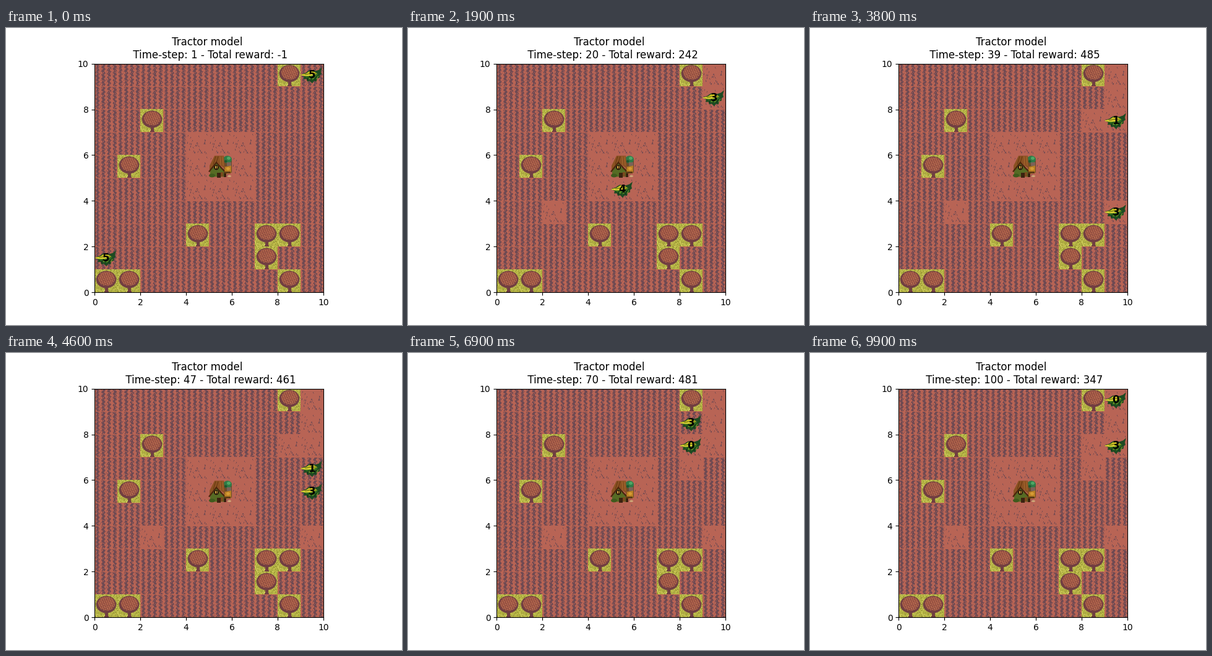
These frames come from a looping animation (640x480 px, 10000 ms). A matplotlib script:

```python
import numpy as np
import matplotlib.pyplot as plt
from matplotlib.animation import FuncAnimation
from matplotlib.patches import Circle, Ellipse, Polygon, Rectangle
from matplotlib.transforms import Affine2D

N, S = 10, 37  # cells per side, pixels per cell
STEPS = 100
rng = np.random.default_rng(4)
yy, xx = np.mgrid[:S, :S].astype(float)

SOIL = np.array([184, 100, 85])
FURROW = np.array([108, 73, 82])
TREES = [(8, 9), (2, 7), (1, 5), (4, 2), (7, 2), (8, 2), (7, 1),
         (0, 0), (1, 0), (8, 0)]
YARD = {(x, y) for x in range(4, 7) for y in range(4, 7)}

# One letter per step: a move, H for harvest, a dot for waiting
ROUTES = [
    ((0, 1), "URURHUUDL.R" ".R.RU.DR.R." "RDRU.L.R.RD" "HD.U.D.U..."
             "UU..L.R..L." ".U.D.R.U..." "UUL..R.L.R." "D.U.U.D.L.R"
             "D.U.D......"),
    ((9, 9), "..H..D...U." "D.H.D.U.D.H" ".UU.D...L.D" ".H.R.D.L.R."
             "...L..H..U." ".R.U.L.D..." "...D.U....." "........R.L"
             ".U..RU....."),
]
DIRS = {"U": (0, 1), "D": (0, -1), "L": (-1, 0), "R": (1, 0)}
COST = [(0, 9, 29, 46, 69, 82, 99), (-1, -29, -87, -139, -219, -258, -353)]


def mix(tile, mask, color):
    m = np.clip(mask, 0, 1)[..., None]
    return tile * (1 - m) + np.array(color) * m


def dirt_tile():
    mask = np.zeros((S, S))
    for x, y in rng.integers(1, S - 3, (34, 2)):
        mask[y:y + rng.integers(2, 4), x] = 0.8
        mask[y + 2, x + rng.choice([-1, 1])] = 0.45
    return mix(np.full((S, S, 3), SOIL), mask, FURROW)


def crop_tile():
    row = xx // 9.25
    wave = 1.0 * np.sin(yy * 2 * np.pi / 6.2 + row * 1.9)
    mask = 2.7 - np.abs(xx % 9.25 - 4.6 + wave)
    mask = np.clip(mask, 0, 0.95) * (rng.random((S, S)) > 0.1)
    mask = np.maximum(mask, 0.6 * (rng.random((S, S)) < 0.1))
    tile = mix(np.full((S, S, 3), SOIL), mask, FURROW)
    tile[0] = tile[:, 0] = (188, 100, 82)
    return tile


def tree_tile():
    noise = rng.random((S, S))
    tile = mix(np.full((S, S, 3), (180, 178, 66)), noise > 0.75, (205, 203, 92))
    tile = mix(tile, noise < 0.15, (146, 145, 52))
    trunk = (np.abs(xx - 19) < 2.4 + 0.25 * np.maximum(yy - 32, 0)) & (yy > 26)
    tile = mix(tile, trunk, (112, 62, 66))
    r = np.hypot((xx - 18.5) / 17, (yy - 16) / 14.5)
    tile = mix(tile, (1 - r) * 12, (112, 62, 66))
    lit = np.hypot((xx - 19) / 14.5, (yy - 14.5) / 12)
    tile = mix(tile, (1 - lit) * 7, (161, 87, 68))
    leaf = np.sin(xx * 1.3 + yy * 0.7) * np.sin(yy * 1.5 - xx * 0.5)
    tile = mix(tile, (leaf > 0.4) * (lit < 0.95) * 0.7, (196, 124, 90))
    return mix(tile, (leaf < -0.5) * (r < 0.9) * 0.7, (118, 64, 62))


def cell(x, y):
    return np.s_[(N - 1 - y) * S:(N - y) * S, x * S:(x + 1) * S]


def simulate():
    spots = [list(start) for start, _ in ROUTES]
    loads, bare, states = [5, 5], set(), []
    for k in range(STEPS):
        for i, (_, route) in enumerate(ROUTES):
            act = route[k - 1] if k else "."
            if act == "H":
                loads[i] -= 1
                bare.add(tuple(spots[i]))
            dx, dy = DIRS.get(act, (0, 0))
            spots[i] = [spots[i][0] + dx, spots[i][1] + dy]
        reward = 100 * len(bare) + round(np.interp(k, *COST))
        states.append(([tuple(s) for s in spots], list(loads), set(bare), reward))
    return states


def draw(patches, move, z):
    for p in patches:
        p.set(transform=PIXEL + move + ax.transData, zorder=z)
        p.set_clip_on(False)
        ax.add_artist(p)


def poly(color, *pts):
    return Polygon(pts, fc=color, ec="none")


def streak(color, width, *pts):
    return Polygon(pts, closed=False, fill=False, ec=color, lw=width)


def box(color, x, y, w, h):
    return Rectangle((x, y), w, h, fc=color, ec="none")


def house():
    return [
        box("#6b4a2c", 24, 9, 13, 20),
        Ellipse((30, 7), 14, 12, fc="#2f7a46"),
        Ellipse((32, 5), 6, 5, fc="#4fa765"),
        Ellipse((27, 10), 5, 4, fc="#1f5530"),
        box("#7b6257", 29, 12, 7, 6),
        poly("#b97f24", (25, 19), (36, 17), (36, 29), (25, 31)),
        Ellipse((31, 22), 6, 5, fc="#d69c35"),
        box("#5d3b18", 23, 27, 12, 3),
        poly("#8a5122", (1, 17), (9, 1), (24, 1), (26, 22), (19, 17), (12, 11), (1, 27)),
        *[streak("#63360f", 0.7, (x, 2), (x - 4, 15)) for x in (11, 15)],
        *[streak("#a96a30", 0.7, (x, 2), (x + 1, 17)) for x in (18, 22)],
        poly("#566b24", (2, 26), (12, 13), (24, 25), (24, 35), (2, 35)),
        streak("#4a260c", 1.6, (0, 27), (12, 12), (25, 26)),
        Circle((12, 20), 4, fc="#2b1a0c"),
        box("#c69a3d", 10, 18, 1.7, 4),
        box("#c69a3d", 12.6, 18, 1.7, 4),
        Ellipse((5, 33), 10, 6, fc="#3f5a1d"),
        box("#3a2210", 13, 29, 6, 8),
        box("#7a4a1d", 19, 28, 4, 7),
        box("#3a2210", 24, 30, 4, 6),
        Ellipse((33, 34), 6, 3, fc="#d0a878"),
    ]


def corn():
    return [
        poly("#1d4a22", (0, 18), (8, 15), (14, 11), (24, 12), (30, 10), (35, 6),
             (33, 13), (34, 17), (31, 19), (31, 23), (27, 24), (26, 29),
             (22, 28), (19, 32), (15, 28), (11, 29), (10, 25), (5, 25), (6, 21)),
        poly("#36701f", (6, 20), (16, 18), (29, 16), (24, 23), (18, 27), (11, 23)),
        poly("#d2c21f", (0, 18), (9, 16), (15, 12), (22, 13), (27, 16),
             (21, 19), (13, 20), (6, 20)),
        streak("#6b7a1c", 0.9, (7, 18), (16, 16), (25, 16)),
        streak("#f1e64a", 0.7, (1, 18.5), (11, 19), (20, 18)),
        *[streak("#10301a", 0.8, (x, 21), (x - 2, 27)) for x in (13, 19, 25)],
        *[streak("#86a526", 0.7, (x, 20), (x - 3, 25)) for x in (17, 23, 29)],
    ]


def update(k):
    spots, loads, bare, reward = STATES[k]
    grid = land.copy()
    for spot in bare:
        grid[cell(*spot)] = dirt
    field.set_data(grid)
    for (x, y), load, move, label in zip(spots, loads, moves, labels):
        move.clear().translate(x, y)
        label.set_position((x + 0.5, y + 0.5))
        label.set_text(str(load))
    ax.set_title(f"Tractor model \n Time-step: {k + 1} - Total reward: {reward}")
    return [field, *labels]


dirt, crop, tree = (t().astype(np.uint8) for t in (dirt_tile, crop_tile, tree_tile))
land = np.tile(crop, (N, N, 1))
for spot in YARD:
    land[cell(*spot)] = dirt
for spot in TREES:
    land[cell(*spot)] = tree

STATES = simulate()
PIXEL = Affine2D().scale(1 / S, -1 / S).translate(0, 1)

fig, ax = plt.subplots(figsize=(6.4, 4.8), dpi=100)
field = ax.imshow(land, extent=(0, N, 0, N), interpolation="nearest")
draw(house(), Affine2D().translate(5, 5), 1.5)

moves = [Affine2D() for _ in ROUTES]
for move in moves:
    draw(corn(), move, 2)
labels = [ax.text(0, 0, "", weight="bold", size=12, ha="center", va="center",
                  zorder=3) for _ in ROUTES]
ax.set(xlim=(0, N), ylim=(0, N))

anim = FuncAnimation(fig, update, frames=STEPS, interval=100, repeat=True)
plt.show()
```
